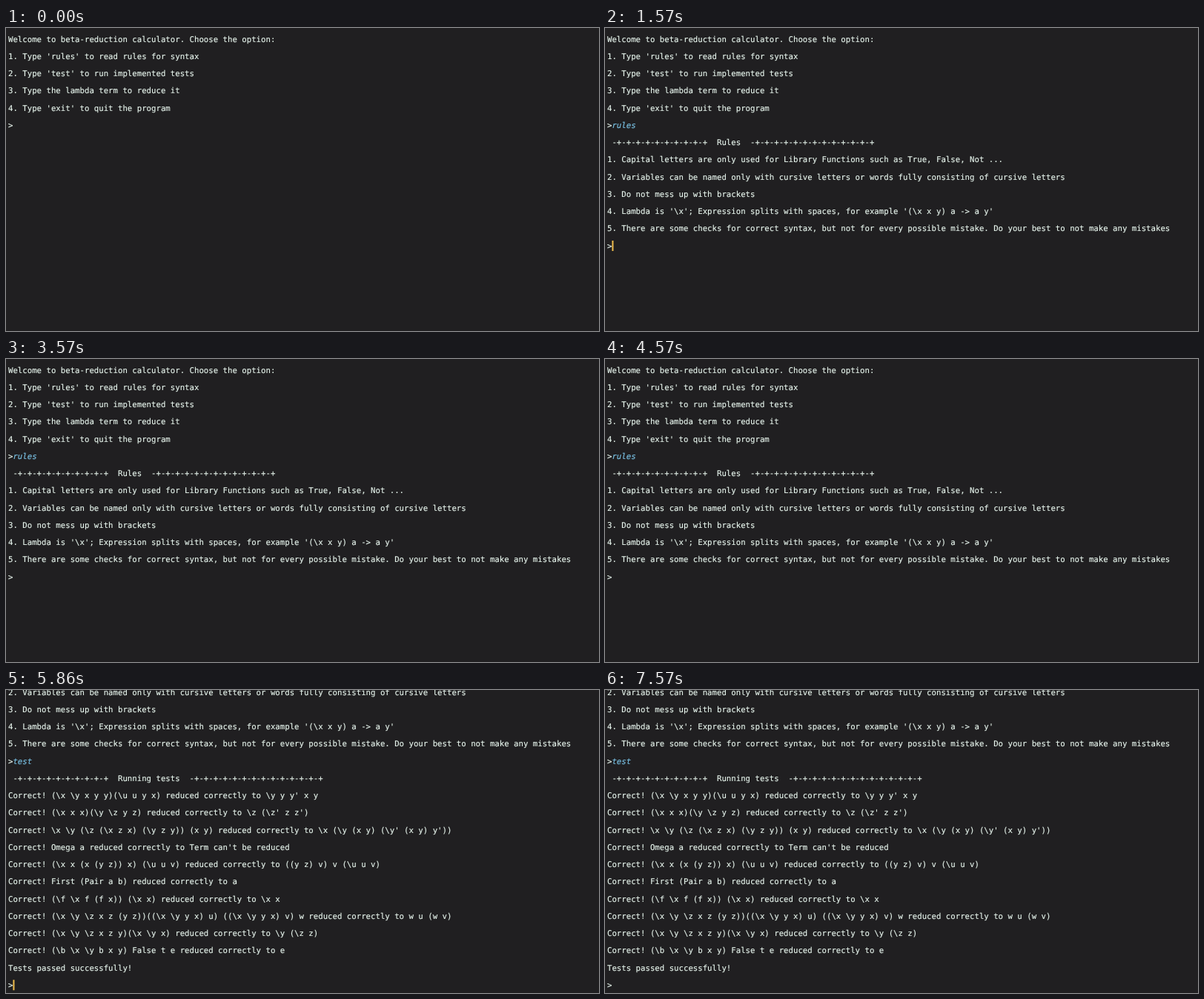
Write an HTML page that moves like this. It is 800x409 px and loops after 8000 ms.

```html
<!DOCTYPE html>
<html lang="en">
<head>
<meta charset="utf-8">
<title>Beta-reduction calculator</title>
<style>
  :root { --col: 6.435px; --row: 23.25px; }
  html, body {
    margin: 0;
    width: 100%;
    height: 100%;
    overflow: hidden;
    background: #201f21;
  }
  main {
    position: absolute;
    inset: 0;
    overflow: clip;
    contain: strict;
  }
  #screen {
    position: absolute;
    left: 3px;
    top: 3.5px;
    animation: scroll 8s step-end infinite;
  }
  pre {
    margin: 0;
    font: 10.69px/var(--row) "DejaVu Sans Mono", monospace;
    color: #e6f4ec;
    -webkit-text-stroke: 0.15px;
    white-space: pre;
    text-rendering: geometricPrecision;
    font-kerning: none;
  }
  i { display: inline-block; color: #7ac3e6; }
  #cmd1 { animation: type1 8s step-end infinite; }
  #cmd2 { animation: type2 8s step-end infinite; }
  #out1 { animation: print1 8s step-end infinite; }
  #out2 { animation: print2 8s step-end infinite; }
  #caret {
    position: absolute;
    left: -0.4px;
    top: 4.25px;
    width: 2px;
    height: 14px;
    background: #f0bd4c;
    animation: move 8s step-end infinite, blink 8s step-end infinite;
  }

  /* typing: reveal whole characters */
  @keyframes type1 {
    0%     { clip-path: inset(0 100% 0 0); }
    8.875% { clip-path: inset(0 80% 0 0); }
    12.5%  { clip-path: inset(0 20% 0 0); }
    14.25%, 100% { clip-path: inset(0 -20% 0 0); }
  }
  @keyframes type2 {
    0%     { clip-path: inset(0 100% 0 0); }
    60.75% { clip-path: inset(0 75% 0 0); }
    62.5%  { clip-path: inset(0 50% 0 0); }
    64.25%, 100% { clip-path: inset(0 -20% 0 0); }
  }

  /* program output */
  @keyframes print1 {
    0% { visibility: hidden; }
    19.625%, 100% { visibility: visible; }
  }
  @keyframes print2 {
    0% { visibility: hidden; }
    73.25%, 100% { visibility: visible; }
  }
  @keyframes scroll {
    0% { transform: none; }
    73.25%, 100% { transform: translateY(-198px); }
  }

  @keyframes move {
    0%      { translate: var(--col) calc(5 * var(--row)); }
    8.875%  { translate: calc(2 * var(--col)) calc(5 * var(--row)); }
    12.5%   { translate: calc(5 * var(--col)) calc(5 * var(--row)); }
    14.25%  { translate: calc(6 * var(--col)) calc(5 * var(--row)); }
    17.875% { translate: 0px calc(6 * var(--row)); }
    19.625% { translate: var(--col) calc(12 * var(--row)); }
    60.75%  { translate: calc(2 * var(--col)) calc(12 * var(--row)); }
    62.5%   { translate: calc(3 * var(--col)) calc(12 * var(--row)); }
    64.25%  { translate: calc(5 * var(--col)) calc(12 * var(--row)); }
    69.625% { translate: 0px calc(13 * var(--row)); }
    73.25%, 100% { translate: var(--col) calc(25 * var(--row)); }
  }
  @keyframes blink {
    0%, 32.125%, 44.625%, 57.125%, 82.125%, 94.625%, 100% { opacity: 0; }
    7.125%, 37.5%, 50%, 60.75%, 89.25% { opacity: 1; }
  }
</style>
</head>
<body>
<main>
<div id="screen">
<pre>Welcome to beta-reduction calculator. Choose the option:
1. Type 'rules' to read rules for syntax
2. Type 'test' to run implemented tests
3. Type the lambda term to reduce it
4. Type 'exit' to quit the program
&gt;<i id="cmd1">rules</i>
<span id="out1"> -+-+-+-+-+-+-+-+-+-+  Rules  -+-+-+-+-+-+-+-+-+-+-+-+-+
1. Capital letters are only used for Library Functions such as True, False, Not ...
2. Variables can be named only with cursive letters or words fully consisting of cursive letters
3. Do not mess up with brackets
4. Lambda is '\x'; Expression splits with spaces, for example '(\x x y) a -&gt; a y'
5. There are some checks for correct syntax, but not for every possible mistake. Do your best to not make any mistakes
&gt;</span><i id="cmd2">test</i>
<span id="out2"> -+-+-+-+-+-+-+-+-+-+  Running tests  -+-+-+-+-+-+-+-+-+-+-+-+-+-+
Correct! (\x \y x y y)(\u u y x) reduced correctly to \y y y' x y
Correct! (\x x x)(\y \z y z) reduced correctly to \z (\z' z z')
Correct! \x \y (\z (\x z x) (\y z y)) (x y) reduced correctly to \x (\y (x y) (\y' (x y) y'))
Correct! Omega a reduced correctly to Term can't be reduced
Correct! (\x x (x (y z)) x) (\u u v) reduced correctly to ((y z) v) v (\u u v)
Correct! First (Pair a b) reduced correctly to a
Correct! (\f \x f (f x)) (\x x) reduced correctly to \x x
Correct! (\x \y \z x z (y z))((\x \y y x) u) ((\x \y y x) v) w reduced correctly to w u (w v)
Correct! (\x \y \z x z y)(\x \y x) reduced correctly to \y (\z z)
Correct! (\b \x \y b x y) False t e reduced correctly to e
Tests passed successfully!
&gt;</span></pre>
<div id="caret"></div>
</div>
</main>
</body>
</html>
```
